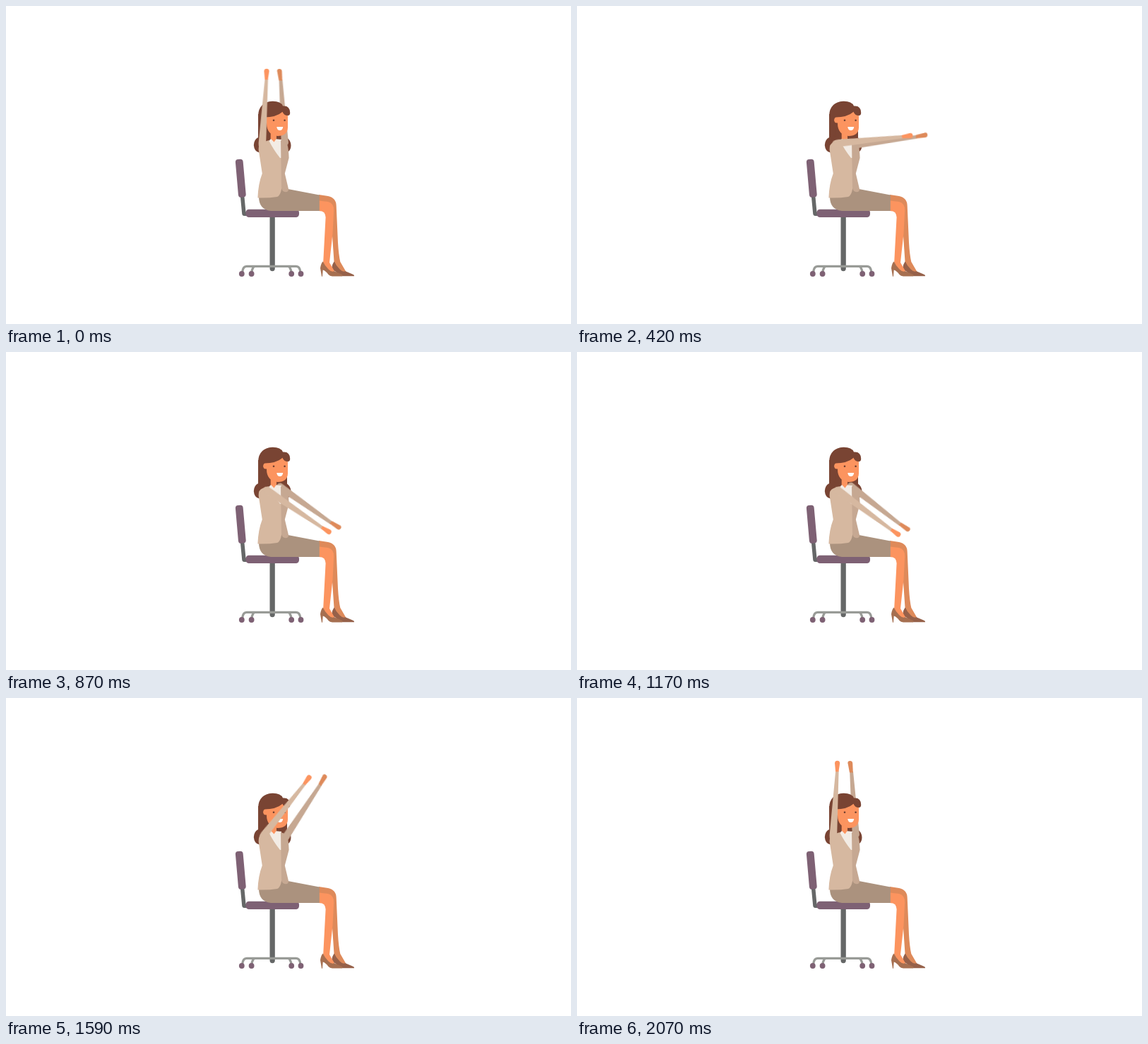
These frames come from a looping animation (800x450 px, 2100 ms). An HTML page:

```html
<!DOCTYPE html>
<html lang="en">
<head>
<meta charset="utf-8">
<title>Chair stretch</title>
<style>
  html, body { margin: 0; width: 100%; height: 100%; overflow: hidden; background: #fff; }
  svg { display: block; width: 100vw; height: 100vh; }

  .skin { fill: #fc945f; }
  .skin-far { fill: #de8a5a; }
  .hair { fill: #794433; }
  .cloth { fill: #d6b8a0; }
  .cloth-far { fill: #c6a892; }
  .skirt { fill: #ab927e; }
  .shirt { fill: #f3ece5; }
  .shoe { fill: #a66f50; }
  .shoe-far { fill: #96614a; }
  .pad { fill: #7e6174; }
  .metal { fill: #656767; }
  .base { fill: none; stroke: #999b97; stroke-width: 3.3; }

  /* quadratic ease-out, down in 1020 ms, up in 900 ms */
  .arm { animation: sweep 2100ms cubic-bezier(.3333, .6667, .6667, 1) infinite; }
  .near { --turn: 123.3deg; transform-origin: 366.7px 198.6px; }
  .far {
    --turn: 132deg;
    transform-origin: 395px 193px;
    animation: sweep 2100ms cubic-bezier(.3333, .6667, .6667, 1) infinite, shoulder 2100ms infinite;
  }
  @keyframes sweep {
    0%, 98.571%, 100% { transform: rotate(0deg); }
    48.571%, 55.714% { transform: rotate(var(--turn)); }
  }
  @keyframes shoulder {
    0% { translate: 0 0; animation-timing-function: ease-out; }
    5.714% { translate: 1.5px 3px; animation-timing-function: linear; }
    20% { translate: -2px 4px; animation-timing-function: linear; }
    31.43% { translate: -6px 1px; animation-timing-function: ease-out; }
    48.571%, 55.714% { translate: -7.5px -3.2px; animation-timing-function: ease-out; }
    63.9% { translate: -2px 4px; animation-timing-function: linear; }
    75.714% { translate: 1.5px 3.5px; animation-timing-function: ease-out; }
    98.571%, 100% { translate: 0 0; }
  }
</style>
</head>
<body>
<svg viewBox="0 0 800 450" xmlns="http://www.w3.org/2000/svg">
  <!-- chair -->
  <path d="M334.5 268L337 294.3H343" fill="none" stroke="#656767" stroke-width="5.5" stroke-linejoin="round"/>
  <rect class="pad" x="326.9" y="216.8" width="10.8" height="54" rx="4" transform="rotate(-5 332.3 243.8)"/>
  <path class="metal" d="M373.5 297H380.8V371.5A3.65 3.65 0 0 1 373.5 371.5Z"/>
  <rect class="pad" x="339.5" y="287.8" width="75.5" height="11.2" rx="4.5"/>
  <path class="base" d="M334.5 377Q335.5 368.4 340.5 368.4H411Q416 368.4 417 377M347.8 377Q348.5 371 351.5 368.5M404 377Q403.3 371 400.3 368.5"/>
  <g class="pad">
    <circle cx="333.8" cy="379" r="3.9"/>
    <circle cx="347.6" cy="379" r="3.9"/>
    <circle cx="404.2" cy="379" r="3.9"/>
    <circle cx="417.5" cy="379" r="3.9"/>
  </g>

  <!-- legs -->
  <path class="skin-far" d="M443 267L456 269Q467.7 271.5 467.7 283L470 335Q471 352 473.3 362L482 377L474 380L464.8 366L461.8 322L450 290H443Z"/>
  <path class="shoe-far" d="M464.8 361.5Q461.8 365 461.3 371L462 374Q466 374 471 380Q473 382.3 476 382.3H493Q493.5 380.5 490 379.3L480.5 375.3Q477 377 472.5 372.5Q467 367 464.8 361.5Z"/>
  <path class="skin" d="M443 275.5L456 277Q464.2 279 464.2 289L462.5 322L458 363L466 377L458 380L449 366L452.6 299Q453 290 443 290Z"/>
  <path class="shoe" d="M448.7 361.5Q446 364 445 371L447 382.8H448L448.7 373.5Q452.5 374.5 456.5 380Q458.5 382.4 462 382.4H475.5Q477.5 382 476 380L464.8 375.3Q461 377 456.5 372.5Q451 367 448.7 361.5Z"/>
  <path class="skirt" d="M358 269L386 258H394L443.8 267.5V290H375Q358 288 358 270Z"/>

  <!-- back hair -->
  <path class="hair" d="M357 153V186Q351 189 350.8 197Q351.5 206.5 359 207.5L372 200H392L400 206Q403.5 203 403.5 197Q403 190 398 186.5V150Z"/>

  <g class="arm far">
    <path class="cloth-far" d="M386.2 104L389.7 193A5.1 5.1 0 0 0 399.9 193L391 104Z"/>
    <path class="skin-far" d="M386 105.5L383.4 92Q383.3 89 386.5 88.9Q389.8 88.8 390.2 92L390.8 105.5Z"/>
  </g>

  <!-- torso -->
  <path class="shirt" d="M371 192L375.5 187.5L390 189V216H386Z"/>
  <path class="skin" d="M374.7 174H383V187.5L379.5 192.5L374.7 187.5Z"/>
  <path class="cloth" d="M372 190L363 193Q357.3 195 357.6 203L362.8 237Q357 252 356.4 271.5Q372 272 384 270Q388.5 268.5 390.3 258V215H388Q379 204 372 190Z"/>
  <path class="cloth-far" d="M389 190L396 192.5Q400 195 400.6 215L394.8 237L400 259Q400 263.3 396 263.3Q391 263 390 257.5Z"/>

  <!-- head -->
  <path class="skin" d="M368.5 150H399V172Q398.5 184 384.5 184Q369 182 369 166Z"/>
  <circle class="skin" cx="368" cy="161.3" r="4.3"/>
  <path class="hair" d="M357 180V155Q358 136 377 134.8Q389 134.5 392 141.5Q402 140.5 402.2 151Q402.3 155 399 155Q393.5 155 391.5 149.8Q383 157.5 365.5 157.5Q363 161 365 165L366 185Z"/>
  <circle cx="379" cy="161.7" r="1.3" fill="#6b3d2e"/>
  <circle cx="394.6" cy="161.7" r="1.3" fill="#6b3d2e"/>
  <path d="M383.3 171H392.2Q391.7 176 387.7 176Q383.8 176 383.3 171Z" fill="#fff"/>

  <g class="arm near">
    <path class="cloth" d="M366.2 103L357.6 194Q357.2 203 363 203.5Q368 203 368.2 193L370.6 103Z"/>
    <path class="skin" d="M366.1 104.3L365 92Q365.2 88.8 368.7 88.7Q372.2 88.8 372.2 92.5L370.4 104.3Z"/>
  </g>
</svg>
</body>
</html>
```
